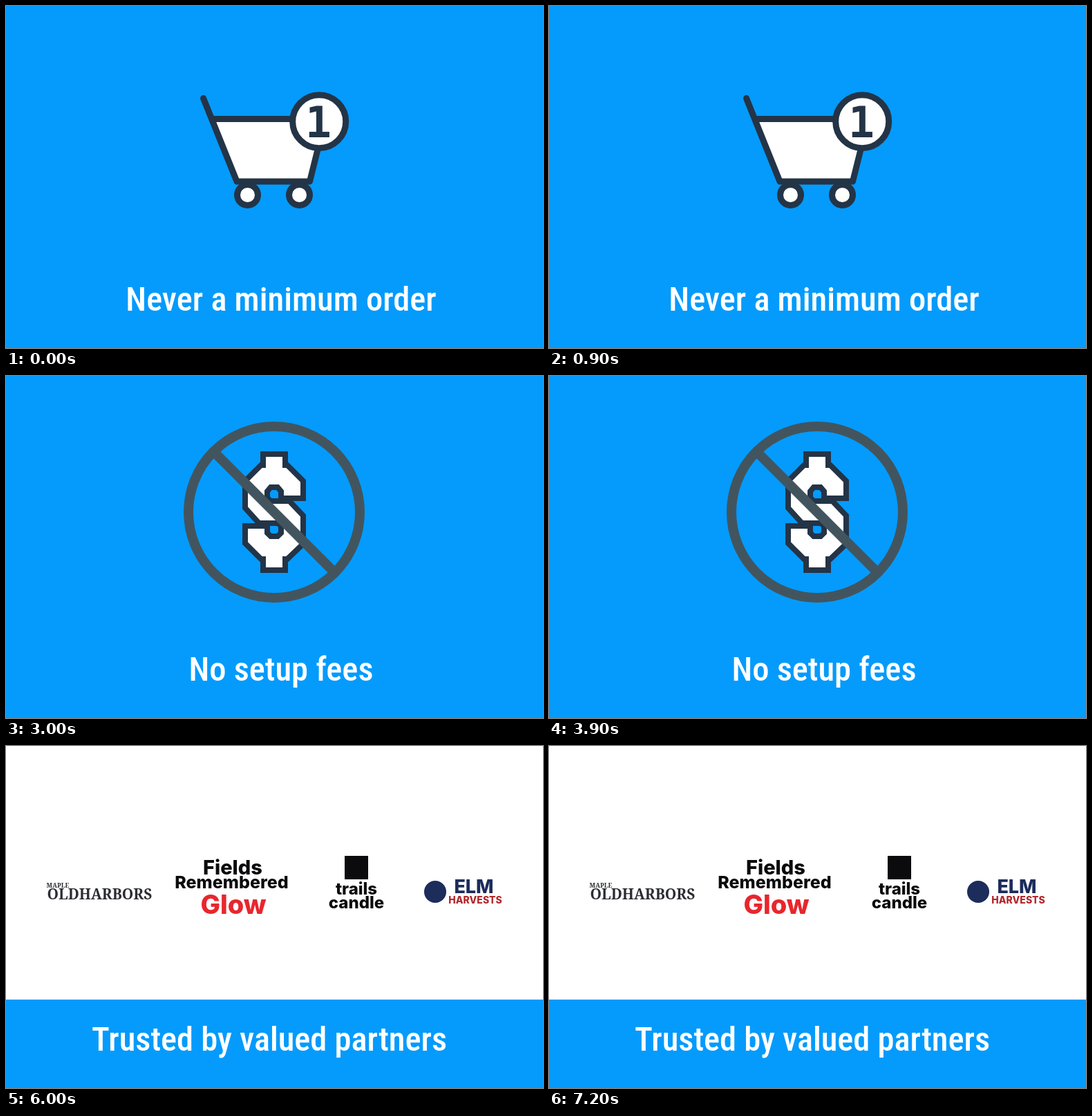
These frames come from a looping animation (777x495 px, 8 s). An HTML page:

```html
<!DOCTYPE html>
<html lang="en">
<head>
<meta charset="utf-8">
<title>Ordering benefits</title>
<style>
  html, body { margin: 0; width: 100%; height: 100%; overflow: hidden; background: #049bfc; }
  svg { display: block; width: 777px; height: 495px; }
  text { text-anchor: middle; }
  .scene { display: none; }
  .scene.on { display: inline; }
  .caption { font: 500 48.4px "Roboto Condensed", Roboto, sans-serif; font-stretch: 75%; fill: #fff; }
  .one { font: 700 63px "DejaVu Sans Mono", monospace; fill: #243447; }
  .ink { fill: #fff; stroke: #243447; stroke-width: 9; }
  .thin { stroke-width: 8; }
  .round { stroke-linecap: round; stroke-linejoin: round; }
  .ban { fill: none; stroke: #42555f; stroke-width: 14; }
  .serif { font-family: "Noto Serif", serif; font-weight: 700; fill: #2b2d32; }
  .sans { font-family: Inter, sans-serif; font-weight: 800; fill: #0b0b0d; }
  .red { fill: #e8262d; }
  .brick { fill: #b3282d; }
  .navy { fill: #1c2c5b; }
</style>
</head>
<body>
<svg viewBox="0 0 777 495">
  <defs>
    <g id="ban" class="ban">
      <circle cx="388" cy="197" r="124"/>
      <path d="M300 109L476 285"/>
    </g>
  </defs>

  <g class="scene">
    <g class="ink round">
      <path d="M298 163.500H462L439.500 254H334L285.500 133.500"/>
      <circle cx="349.500" cy="273.500" r="15"/>
      <circle cx="424.500" cy="273.500" r="15"/>
      <circle cx="453.200" cy="167.200" r="38.500"/>
    </g>
    <text class="one" x="452" y="190">1</text>
    <text class="caption" x="398" y="441">Never a minimum order</text>
  </g>

  <g class="scene">
    <g class="ink thin round">
      <rect x="328" y="127" width="123" height="141" style="stroke: #2b3036"/>
      <path d="M359 162H420M359 182.400H420M359 202.800H420M359 223.200H420M359 243.600H420"/>
    </g>
    <use href="#ban"/>
    <text class="caption" x="398" y="441">No contract required</text>
  </g>

  <g class="scene">
    <path class="ink thin" d="M372 113H404V129H407L430 152V177H398V167L393 161H383L378 167V176L383 181H410L430 202V243L407 265H404V281H372V265H369L346 242V217H378V227L383 232H393L398 227V217L393 213H366L346 191V152L369 129H372Z"/>
    <use href="#ban"/>
    <text class="caption" x="398" y="441">No setup fees</text>
  </g>

  <g class="scene">
    <path fill="#2d3338" d="M199 216L255 160V192C305 192 336 224 335 270C327 249 300 240 255 240V272Z"/>
    <g class="ink thin round" style="stroke: #232d37">
      <path d="M479 130L559 170V270L479 310L399 270V170Z"/>
      <path fill="none" d="M399 170L479 210L559 170M479 210V310M439 150L519 190V210"/>
    </g>
    <text class="caption" x="380" y="441">Best Return Policy</text>
  </g>

  <g class="scene">
    <path fill="#fff" d="M0 0H777V367H0Z"/>
    <g class="serif">
      <text x="75" y="205" font-size="9">MAPLE</text>
      <text x="135.500" y="222" font-size="21">OLDHARBORS</text>
    </g>
    <g class="sans">
      <text x="328" y="186" font-size="29">Fields</text>
      <text x="326.500" y="206" font-size="25">Remembered</text>
      <text class="red" x="329" y="243" font-size="38">Glow</text>
      <path d="M490 159H524V193H490Z"/>
      <text x="507" y="215" font-size="24">trails</text>
      <text x="507" y="235" font-size="24">candle</text>
      <circle class="navy" cx="621" cy="211" r="16"/>
      <text class="navy" x="677" y="213" font-size="27">ELM</text>
      <text class="brick" x="679" y="228" font-size="14">HARVESTS</text>
    </g>
    <text class="caption" x="381" y="441">Trusted by valued partners</text>
  </g>
</svg>
<script>
  const LOOP = 8000, STEP = 1500;
  const scenes = [...document.querySelectorAll(".scene")];

  function draw() {
    const time = performance.now() % LOOP;
    const current = Math.min(scenes.length - 1, Math.floor(time / STEP));
    scenes.forEach((scene, i) => scene.classList.toggle("on", i === current));
    requestAnimationFrame(draw);
  }
  draw();
</script>
</body>
</html>
```
